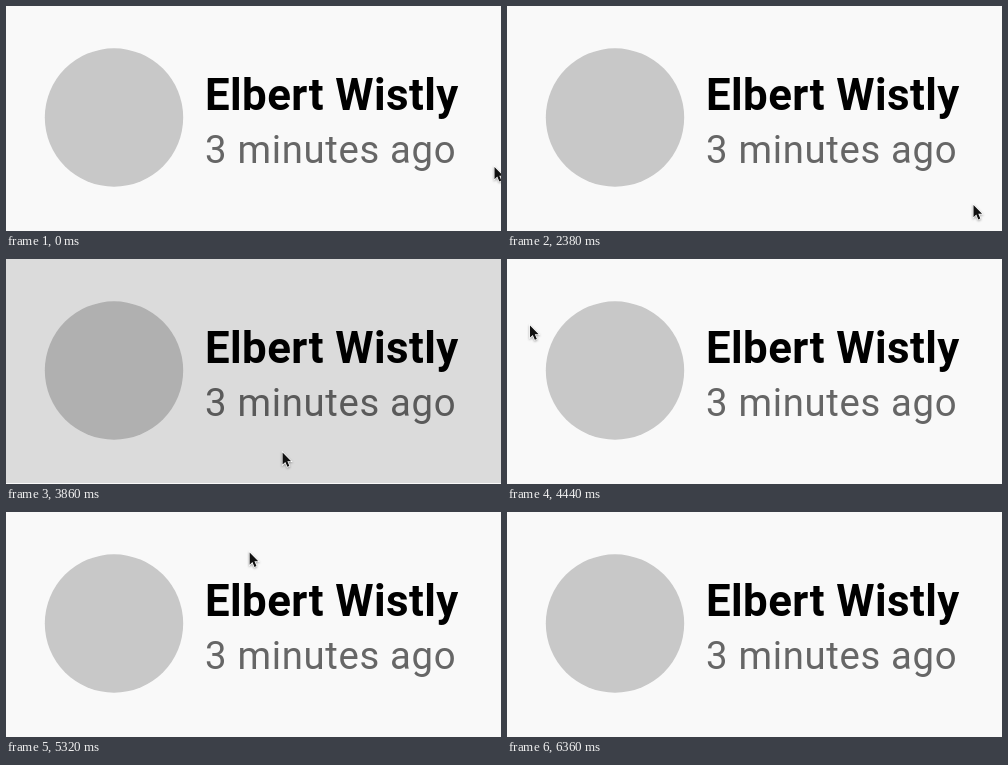
Recreate the animation shown at these times as an HTML page. Size 495x225 px, loop 7.26 s.

```html
<!DOCTYPE html>
<html lang="en">
<head>
<meta charset="utf-8">
<title>List item with press ripple</title>
<style>
  html, body { margin: 0; width: 100%; height: 100%; overflow: hidden; background: #f9f9f9; }
  svg { display: block; width: 495px; height: 225px; font-family: Roboto, sans-serif; }
  #cursor { filter: drop-shadow(0 1px 1px rgba(0, 0, 0, .35)); }
</style>
</head>
<body>
<svg viewBox="0 0 495 225">
  <defs>
    <radialGradient id="soft">
      <stop offset=".65"/>
      <stop offset="1" stop-opacity="0"/>
    </radialGradient>
  </defs>
  <rect width="495" height="225" fill="#f9f9f9"/>
  <circle cx="108" cy="111.5" r="69.2" fill="#c8c8c8"/>
  <text x="199" y="104" font-size="43.8" font-weight="700" letter-spacing=".41">Elbert Wistly</text>
  <text x="199" y="156.7" font-size="38.3" letter-spacing=".68" fill="#666">3 minutes ago</text>
  <rect id="tint" width="495" height="224"/>
  <circle id="ripple" cx="280" cy="179" r="176" fill="url(#soft)" opacity=".12"/>
  <path id="cursor" d="M0 0V12.2l2.8-2.6 2 4.8 2-.9-2-4.7H8.6z"
        fill="#111" stroke="#fff" stroke-width="1.4" paint-order="stroke"/>
</svg>
<script>
const LOOP = 7260, ENTER = 2380, EXIT = 6360, TICK = 147.4;
const HOVER = .005, PRESS = .12;

const clamp = v => Math.min(1, Math.max(0, v));
const inOut = u => u < .5 ? 4 * u ** 3 : 1 - 4 * (1 - u) ** 3;
const out = u => 1 - (1 - u) ** 1.8;

// Cursor moves, timed in ticks after it enters; "via" bends the path
const start = [466.5, 199];
const moves = [
  { from: 3.4, to: 6.4, end: [286.5, 195], ease: inOut },
  { from: 9.95, to: 14, end: [14.5, 49], via: [60, 160], ease: out },
  { from: 17.75, to: 19.4, end: [257.5, 40], ease: inOut },
  { from: 24.3, to: 26, end: [488.5, 161], via: [360, 20], ease: inOut }
];
const presses = [10, 17, 23];

const el = id => document.getElementById(id);
const cursor = el('cursor'), tint = el('tint'), ripple = el('ripple');
const show = (node, on) => node.setAttribute('visibility', on ? 'visible' : 'hidden');

function cursorAt(tick) {
  return moves.reduce((a, { from, to, end, via, ease }) => {
    const s = ease(clamp((tick - from) / (to - from)));
    return a.map((p, i) => {
      const mid = via ? via[i] : (p + end[i]) / 2;
      return p * (1 - s) ** 2 + 2 * mid * s * (1 - s) + end[i] * s * s;
    });
  }, start);
}

function draw() {
  const t = performance.now() % LOOP;
  const tick = Math.floor((t + LOOP - ENTER) % LOOP / TICK);
  const hover = tick > 2 && tick < 11 ? HOVER : 0;
  show(cursor, t < 150 || t >= ENTER && t < EXIT);
  cursor.setAttribute('transform', `translate(${cursorAt(tick)})`);
  tint.setAttribute('opacity', presses.includes(tick) ? PRESS : hover);
  show(ripple, tick === presses[0] - 1);
  requestAnimationFrame(draw);
}
draw();
</script>
</body>
</html>
```
